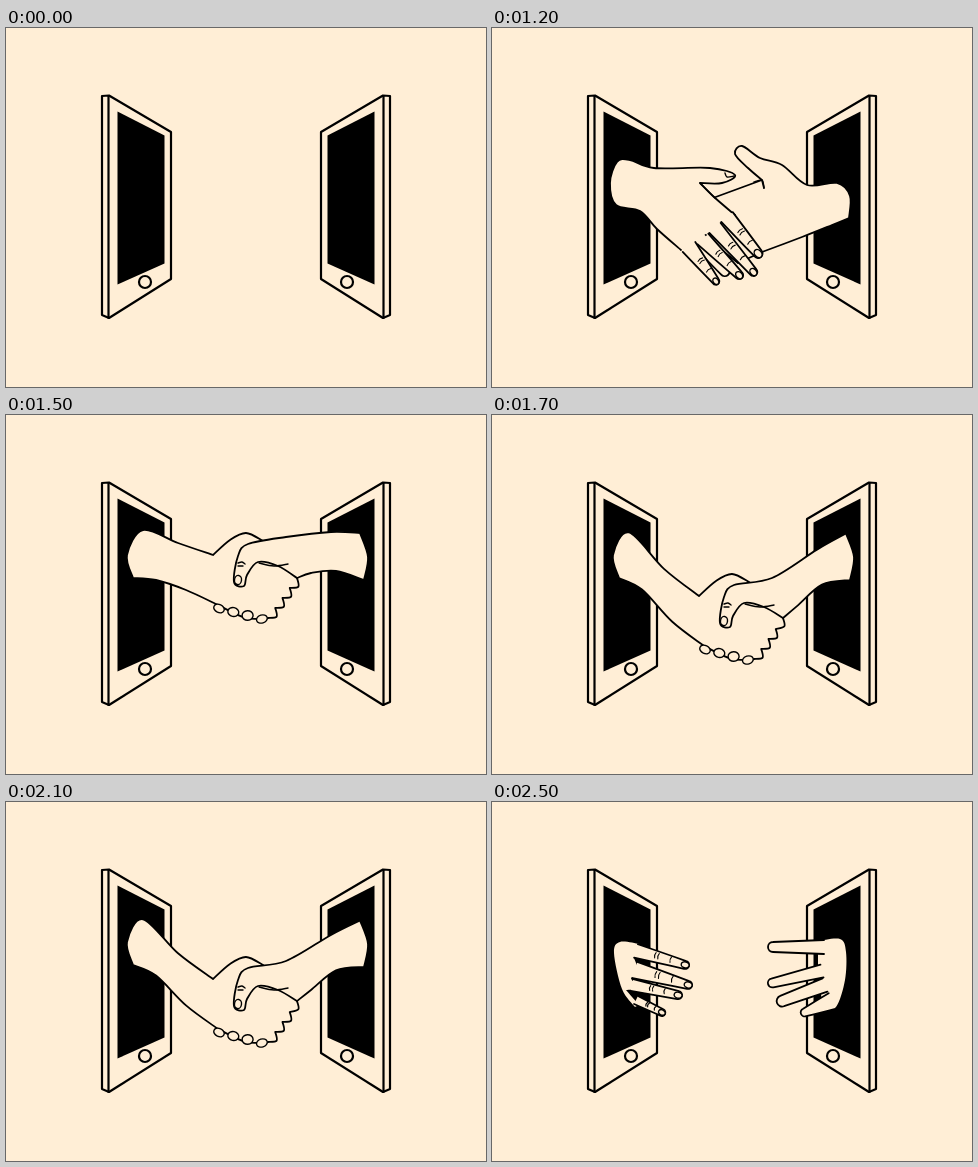
An HTML page for the animation above (2.6 s loop, 480 by 359 pixels).

```html
<!DOCTYPE html>
<html lang="en">
<head>
<meta charset="utf-8">
<title>Handshake between phones</title>
<style>
  html, body { margin: 0; width: 100%; height: 100%; overflow: hidden; background: #ffeed6; }
  svg { display: block; width: 100%; height: 100%; }
  path, circle, ellipse {
    fill: #ffeed6; stroke: #000; stroke-width: 1.8;
    stroke-linejoin: round; stroke-linecap: round; vector-effect: non-scaling-stroke;
  }
  .phone path, .phone circle { stroke-width: 2.2; }
  .phone .screen { fill: #000; stroke: none; }
  .palm { stroke: none; }
  .line { fill: none; stroke-width: 1.4; }
  .tick { fill: none; stroke-width: 1.1; }
  .nail { stroke-width: 1.4; }
  .pose { visibility: hidden; }
  .pose.on { visibility: visible; }
</style>
</head>
<body>
<svg viewBox="0 0 480 359">
  <defs>
    <g id="phone" class="phone">
      <path d="M96 68L103 67.5L165 104V251L103 290L96 287Z"/>
      <path d="M102.5 68V290"/>
      <path class="screen" d="M111.500 83.500L158.500 107.500V235.500L111.500 256.500Z"/>
      <circle cx="139" cy="254" r="6"/>
    </g>
  </defs>
  <use href="#phone"/>
  <use href="#phone" transform="matrix(-1 0 0 1 480 0)"/>
  <g id="hands"></g>
</svg>
<script>
const LOOP = 2600;
const still = (x, y) => [x, y];

// Smooth path through "x y x y"; a slash marks a sharp corner.
function curve(kind, text, warp = still) {
  let d = '', last;
  for (const part of text.split('/')) {
    const n = part.trim().split(/\s+/).map(Number);
    const pts = last ? [last] : [];
    for (let i = 0; i < n.length; i += 2) pts.push(warp(n[i], n[i + 1]));
    if (!last) d = 'M' + pts[0];
    for (let i = 0; i < pts.length - 1; i++) {
      const b = pts[i], c = pts[i + 1];
      const a = pts[i - 1] || b, e = pts[i + 2] || c;
      const out = [0, 1].map(k => b[k] + (c[k] - a[k]) / 6);
      const into = [0, 1].map(k => c[k] - (e[k] - b[k]) / 6);
      d += 'C' + [out, into, c].join(' ');
    }
    last = pts[pts.length - 1];
  }
  return `<path class="${kind}" d="${d}"/>`;
}

function oval(x, y, rx, ry, tilt = 0, warp = still) {
  const [cx, cy] = warp(x, y);
  return `<ellipse class="nail" rx="${rx}" ry="${ry}" transform="translate(${cx} ${cy}) rotate(${tilt})"/>`;
}

// Tapered finger from its root to its tip, open at the root.
function finger(x, y, tipX, tipY, rootWidth, tipWidth, detailed = true) {
  const len = Math.hypot(tipX - x, tipY - y);
  const tilt = Math.atan2(tipY - y, tipX - x) * 180 / Math.PI;
  const a = rootWidth / 2, b = tipWidth / 2, mid = (a + b) / 2, end = len - b;
  let art = `<path d="M0 ${-a}Q${len / 2} ${-mid} ${end} ${-b}A${b} ${b} 0 0 1 ${end} ${b}Q${len / 2} ${mid} 0 ${a}"/>`;
  if (detailed) {
    art += oval(end, 0, b, b * .75);
    for (const k of [.36, .42, .65])
      art += `<path class="tick" d="M${k * len} ${-mid * .7}q-1.5 ${mid * .5} 0 ${mid}"/>`;
  }
  return `<g transform="translate(${x} ${y}) rotate(${tilt})">${art}</g>`;
}

// Row of knuckles bulging to the right of the given line.
function knuckles(x, y, endX, endY, count) {
  const dx = (endX - x) / count, dy = (endY - y) / count;
  let text = '';
  for (let i = 0; i < count; i++)
    text += `/ ${x + dx * (i + .5) + dy * .5} ${y + dy * (i + .5) - dx * .5} ${x + dx * (i + 1)} ${y + dy * (i + 1)} `;
  return text;
}

const group = (art, transform) => `<g transform="${transform}">${art}</g>`;

const reach =
  curve('palm', '147 142 128 140 122 151 130 187 143 205 / 147 203 / 134 188 / 146 186 139 176 148 174 142 156 / 147 155') +
  finger(144, 198, 173, 212, 9, 7) +
  finger(140, 183, 190, 194, 12, 8) +
  finger(143, 168, 200, 184, 17, 8) +
  finger(144, 149, 197, 164, 14, 8) +
  curve('palm', '326 139 348 137 354 150 353 178 344 205 330 208 / 328 176 326 163') +
  finger(340, 199, 309, 212, 17, 8, false) +
  finger(333, 183, 285, 201, 14, 11, false) +
  finger(330, 169, 276, 182, 13, 9, false) +
  finger(332, 145, 276, 145, 14, 10, false);

const rightHand =
  curve('', '272 160 270 152 / 256 140 243 126 250 118 268 130 290 137 315 157 345 155 358 168 357 190 / 340 197 310 209 270 224' +
    '/ 246 235 / 222 215 202 190 221 170 / 270 152') +
  finger(215, 222, 236, 247, 14, 10, false) +
  curve('line', '262 154 270 152 272 160');

const leftHand =
  curve('', '189 222 165 201 148 183 124 177 118 155 125 134 138 132 162 140 218 140 243 147 230 155 208 155 / 222 169 243 187') +
  finger(197, 219, 226, 256, 16, 7) +
  finger(211, 211, 250, 250, 15, 8) +
  finger(223, 200, 264, 247, 15, 8) +
  finger(235, 189, 269, 229, 15, 9) +
  curve('line', '233 145 235 149 242 148') +
  curve('line', '208 155 223 170');

// Forearms stay anchored in the screens while the grip sinks.
const ease = v => { v = Math.min(1, Math.max(0, v)); return v * v * (3 - 2 * v); };

function clasp(dip, base = 0) {
  const warp = (x, y) => [x, y + base + dip * ease((x - 125) / 80) * ease((359 - x) / 75)];
  let art = curve('', '212 190 180 175 150 165 127 163 / 121 140 137 115 172 128 207 140 / 224 125 240 118 257 126 / 285 150 291 163' +
    knuckles(291, 163, 262, 203, 4) + '/ 240 203 212 190', warp);
  for (let i = 0; i < 4; i++)
    art += oval(213 + 14.3 * i, 193.5 + 3.5 * i, 5.5, 4 + i % 3 * .4, 25 - 14 * i, warp);
  return art +
    curve('', '291 163 272 151 252 147 241 160 238 171 228 167 232 141 242 129 280 122 325 117 354 118' +
      '/ 362 142 358 165 / 330 156 305 158 291 163', warp) +
    curve('line', '253 148 268 151 282 149', warp) +
    curve('line', '232 148 236 147 239 149', warp) +
    curve('line', '232 151 237 151', warp) +
    oval(232, 165, 3.5, 4.6, 8, warp);
}

const poses = {
  rest: '',
  reach,
  approach: group(rightHand, 'matrix(.66 0 0 1 122 -6)') + group(leftHand, 'matrix(.7 0 0 1 35.4 -3)'),
  touch: rightHand + leftHand,
  down1: clasp(33),
  up1: clasp(0),
  down2: clasp(41),
  up2: clasp(1, 4),
  down3: clasp(37)
};

const cues = [
  [0, 'rest'], [1000, 'reach'], [1100, 'approach'], [1200, 'touch'],
  [1300, 'down1'], [1500, 'up1'], [1700, 'down2'], [1900, 'up2'], [2100, 'down3'],
  [2300, 'touch'], [2400, 'approach'], [2500, 'reach']
];

document.getElementById('hands').innerHTML = Object.entries(poses)
  .map(([name, art]) => `<g class="pose" id="${name}">${art}</g>`).join('');
const groups = [...document.querySelectorAll('.pose')];
const start = performance.now();

function tick() {
  const t = Math.max(0, performance.now() - start) % LOOP;
  const name = cues.filter(c => c[0] <= t).pop()[1];
  for (const g of groups) g.classList.toggle('on', g.id === name);
  requestAnimationFrame(tick);
}
tick();
</script>
</body>
</html>
```
